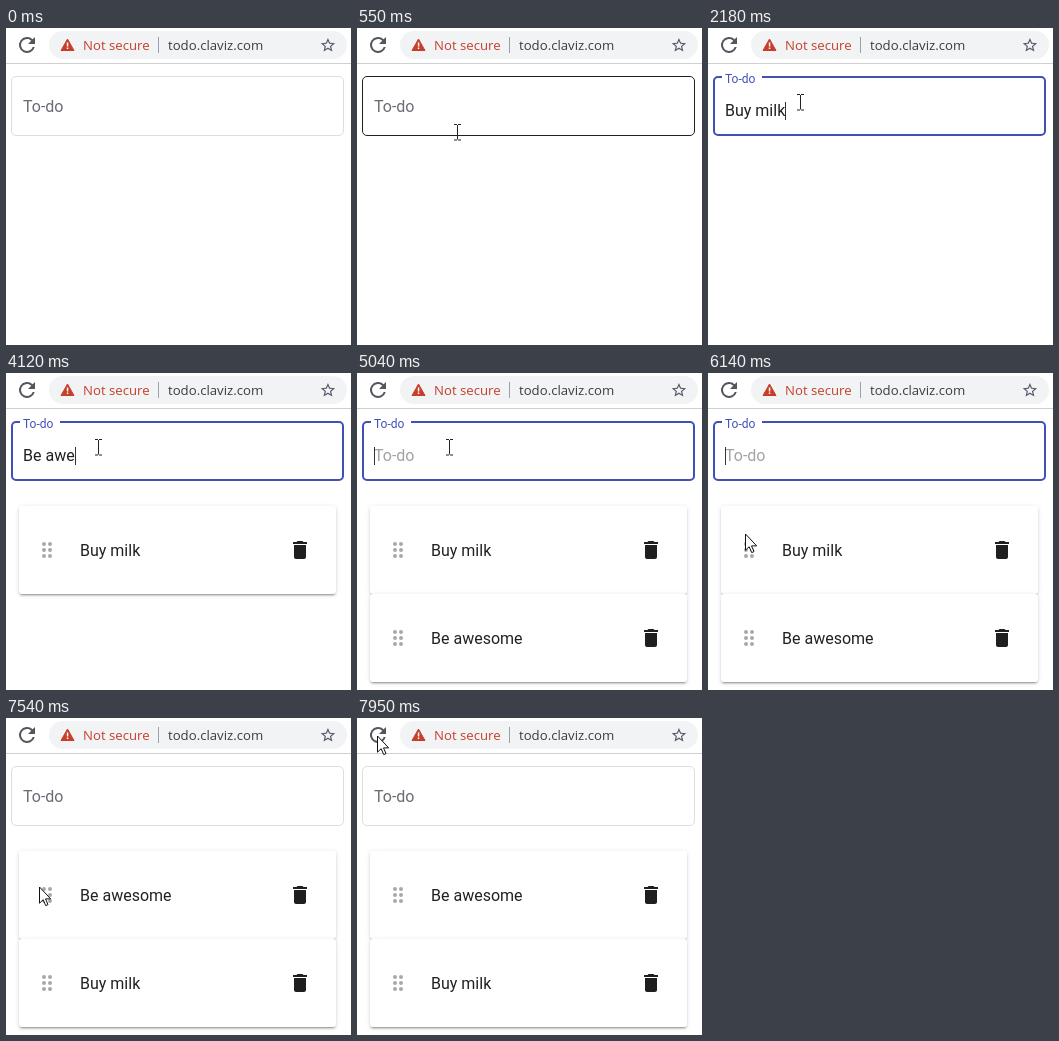
Recreate the animation shown at these times as an HTML page. Size 345 px wide and 317 px high, loop 8 s.

```html
<!DOCTYPE html>
<html lang="en">
<head>
<meta charset="utf-8">
<title>To-do list</title>
<style>
  html, body { margin: 0; width: 100%; height: 100%; overflow: hidden; background: #fff; }
  svg { position: absolute; left: 0; top: 0; }
  text { font: 16px Roboto, sans-serif; white-space: pre; fill: #212121; }
  .bar text { font: 13.2px "Open Sans", sans-serif; }
  .card {
    position: absolute; left: 13px; width: 317px; height: 88px; background: #fff; border-radius: 3px;
    box-shadow: 0 3px 1px -2px rgba(0,0,0,.2), 0 2px 2px rgba(0,0,0,.14), 0 1px 5px rgba(0,0,0,.12);
  }
</style>
</head>
<body>
<div class="card" style="top:133px"></div>
<div class="card" style="top:221px"></div>
<svg width="345" height="317" viewBox="0 0 345 317">
  <defs>
    <g id="handle" fill="#a9a9a4">
      <circle cx="38" cy="-6" r="2"/><circle cx="44" cy="-6" r="2"/>
      <circle cx="38" r="2"/><circle cx="44" r="2"/>
      <circle cx="38" cy="6" r="2"/><circle cx="44" cy="6" r="2"/>
    </g>
    <path id="trash" transform="translate(282 -12)" fill="#1f1f1f"
      d="M6 19c0 1.1.9 2 2 2h8c1.1 0 2-.9 2-2V7H6zM19 4h-3.5l-1-1h-5l-1 1H5v2h14z"/>
  </defs>

  <g class="bar">
    <path fill="#d0d0d0" d="M0 35h345v1H0z"/>
    <rect x="43" y="3" width="298" height="28" rx="14" fill="#f1f3f4"/>
    <path transform="translate(9 5)" fill="#54565d"
      d="M17.65 6.35A8 8 0 1 0 19.73 14h-2.08A6 6 0 1 1 12 6c1.66 0 3.14.69 4.22 1.78L13 11h7V4z"/>
    <path d="M61.5 11 68 22.500H55z" fill="#c53f2b" stroke="#c53f2b" stroke-linejoin="round"/>
    <path d="M60.800 14.500h1.500v4h-1.500zm0 5h1.500v1.500h-1.500z" fill="#fff"/>
    <text x="77" y="22" style="fill:#c53f2b">Not secure</text>
    <path d="M152 9h1v16h-1z" fill="#9aa0a9"/>
    <text x="162" y="22" style="fill:#3a3c40">todo.claviz.com</text>
    <path transform="translate(313.300 8.500) scale(.72)" fill="#55586a"
      d="M22 9.240l-7.190-.620L12 2 9.190 8.630 2 9.240l5.460 4.730L5.820 21 12 17.270 18.180 21l-1.630-7.030zM12 15.400l-3.760 2.270 1-4.280-3.320-2.880 4.380-.380L12 6.100l1.710 4.040 4.380.380-3.320 2.880 1 4.280z"/>
  </g>

  <rect id="border" fill="none"/>
  <path id="notch" d="M14 47h40v4H14z" fill="#fff"/>
  <text id="label">To-do</text>
  <text id="hint" x="17" y="88" style="fill:#a3a3a6">To-do</text>
  <text id="input" x="17" y="88"></text>
  <rect id="caret" y="74" width="1" height="18" fill="#333"/>

  <g class="item" transform="translate(0 177)">
    <use href="#handle"/><text x="74" y="6"></text><use href="#trash"/>
  </g>
  <g class="item" transform="translate(0 265)">
    <use href="#handle"/><text x="74" y="6"></text><use href="#trash"/>
  </g>
  <g id="ghost">
    <use href="#handle" opacity=".5"/>
    <text x="74" y="6" opacity=".4">Buy milk</text>
    <use href="#trash" opacity=".07"/>
  </g>

  <g id="pointer">
    <path id="arrow" d="M.5 0V16.200L4.200 12.700 6.700 18.600 9 17.600 6.500 11.900H11.700z" fill="#fff" stroke="#111"/>
    <path id="beam" d="M-3-7.500H0M1-7.500H4M.5-7V7.500M-3 8H0M1 8H4" fill="none" stroke="#222"/>
    <rect id="badge" x="3.500" y="17.500" width="11" height="7" fill="#fff" stroke="#222" stroke-dasharray="2 1"/>
  </g>
</svg>
<script>
const LOOP = 8000, FOCUS = 740, BLUR = 6380, SWAP = 6520, DROP = 7310;
const entries = [
  { text: "Buy milk", keys: [1110, 1290, 1520, 1610, 1700, 1850, 2030, 2180], added: 2640 },
  { text: "Be awesome", keys: [3180, 3360, 3480, 3740, 3920, 4120, 4330, 4430, 4660, 4710], added: 4990 }
];
// Pointer stops: time, x, y
const stops = [
  [120, 148, 293], [680, 92, 74], [5700, 92, 74], [6120, 37, 161], [6220, 37, 161], [6300, 37, 169],
  [BLUR, 37, 169], [SWAP, 38, 212], [6880, 39, 224], [7160, 40, 244], [DROP - 20, 40, 244], [7940, 20, 18]
];

const $ = id => document.getElementById(id);
const cards = document.querySelectorAll(".card");
const items = document.querySelectorAll(".item");
const clamp = v => Math.max(0, Math.min(1, v));
const smooth = v => v * v * (3 - 2 * v);
const mix = (a, b, v) => a + (b - a) * v;
const show = (el, on) => { el.style.display = on ? "" : "none"; };
const set = (el, attrs) => { for (const name in attrs) el.setAttribute(name, attrs[name]); };

function pointerAt(t) {
  const next = stops.findIndex(stop => stop[0] > t);
  if (next < 1) return stops[next ? stops.length - 1 : 0].slice(1);
  const [a, b] = [stops[next - 1], stops[next]];
  const v = smooth((t - a[0]) / (b[0] - a[0]));
  return [Math.round(mix(a[1], b[1], v)), Math.round(mix(a[2], b[2], v))];
}

function drawField(t, hovered) {
  const focused = t >= FOCUS && t < BLUR;
  const raised = smooth(clamp((t - FOCUS) / 200)) - smooth(clamp((t - BLUR) / 200));
  set($("border"), focused
    ? { x: 6, y: 49, width: 331, height: 58, rx: 4, stroke: "#3f51b5", "stroke-width": 2 }
    : { x: 5.5, y: 48.5, width: 332, height: 59, rx: 4.5, stroke: hovered ? "#212121" : "#dedede", "stroke-width": 1 });
  show($("notch"), raised > 0);
  set($("label"), { transform: `translate(17 ${mix(84, 54.5, raised)}) scale(${mix(1, .75, raised)})` });
  $("label").style.fill = focused ? "#3f51b5" : "#6a6c73";

  const entry = entries.find(e => t < e.added);
  const typed = entry ? entry.text.slice(0, entry.keys.filter(k => k <= t).length) : "";
  $("input").textContent = typed;
  show($("hint"), focused && !typed);
  $("hint").style.opacity = clamp((t - FOCUS - 40) / 160);

  const edits = [FOCUS, ...entries.flatMap(e => [...e.keys, e.added])];
  const lastEdit = Math.max(...edits.filter(time => time <= t));
  const width = typed ? $("input").getComputedTextLength() : 0;
  set($("caret"), { x: Math.round(17 + width) });
  show($("caret"), focused && (t - lastEdit) % 1010 < 505);
}

function drawList(t) {
  const order = t < SWAP ? entries : [...entries].reverse();
  order.forEach((entry, i) => {
    const visible = t >= entry.added;
    show(cards[i], visible);
    show(items[i], visible);
    items[i].querySelector("text").textContent = entry.text;
  });
}

function draw(t) {
  const [x, y] = pointerAt(t);
  const dragging = t >= BLUR + 30 && t < DROP;
  const overField = x > 5 && x < 338 && y >= 48 && y < 108;
  drawField(t, overField);
  drawList(t);
  show($("ghost"), dragging);
  set($("ghost"), { transform: `translate(${x - 37} ${177 + y - 169})` });
  show($("pointer"), t >= 120);
  set($("pointer"), { transform: `translate(${x} ${y})` });
  show($("arrow"), !overField);
  show($("beam"), overField);
  show($("badge"), dragging);
}

function frame() {
  draw(performance.now() % LOOP);
  requestAnimationFrame(frame);
}
frame();
</script>
</body>
</html>
```
